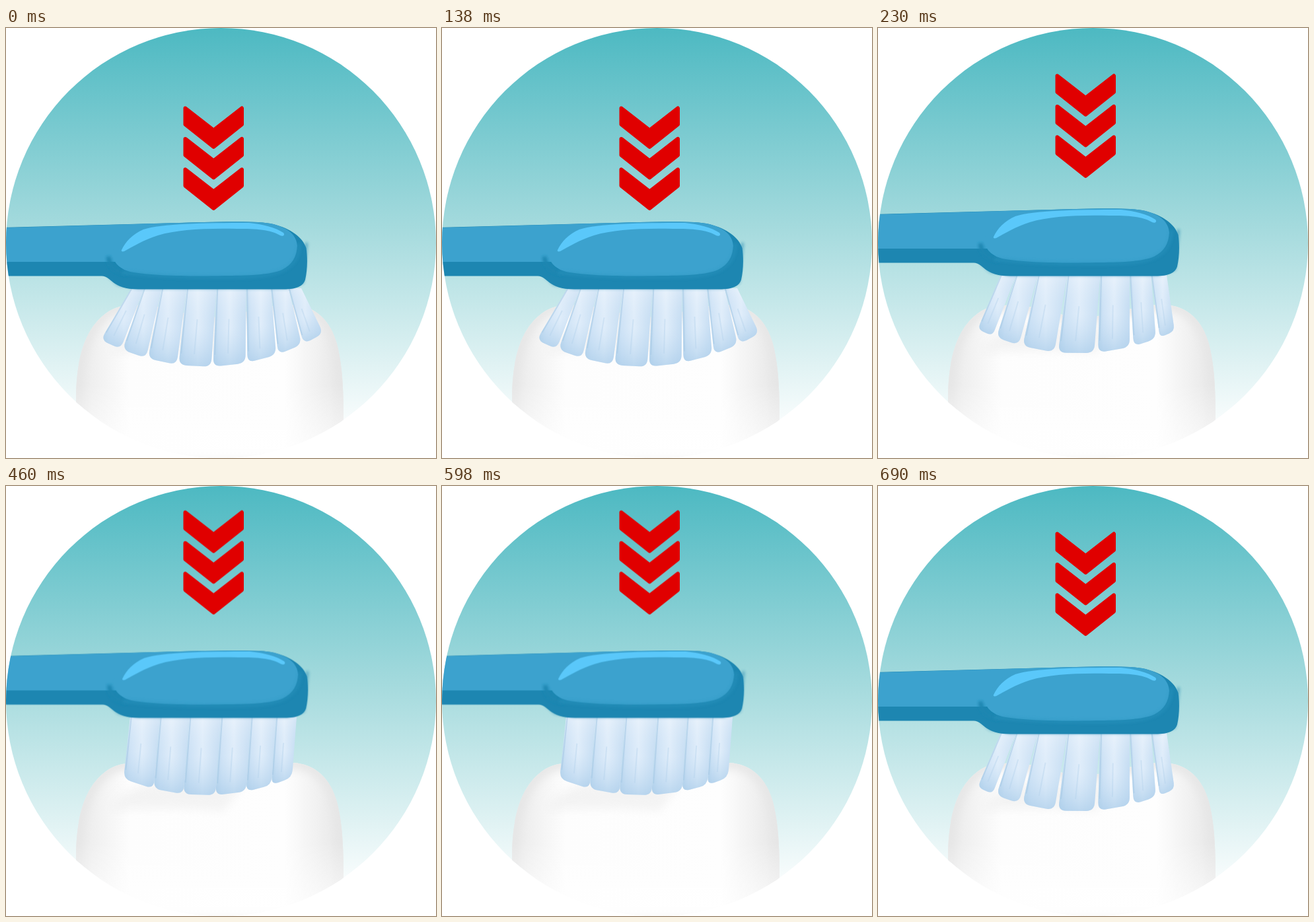
These frames come from a looping animation (651 px wide and 651 px high, 0.92 s). An HTML page:

```html
<!DOCTYPE html>
<html lang="en">
<head>
<meta charset="utf-8">
<title>Brushing pressure</title>
<style>
html, body { margin: 0; width: 100%; height: 100%; overflow: hidden; background: #fff; }
svg { display: block; width: 100%; height: 100%; }
.brush, .arrows, .pose { animation: .92s step-end infinite; }
.brush { animation-name: lift; }
.arrows { animation-name: rise; }
#pressed { animation-name: pressed; }
#middle { animation-name: middle; }
#relaxed { animation-name: relaxed; }
@keyframes lift {
  0%, 100% { transform: translate(0, 0); }
  25%, 75% { transform: translate(0, -20px); }
  50% { transform: translate(1.3px, -44.5px); }
}
@keyframes rise {
  0%, 100% { transform: translateY(0); }
  25%, 75% { transform: translateY(-49px); }
  50% { transform: translateY(-81.5px); }
}
@keyframes pressed { 0%, 100% { opacity: 1; } 25% { opacity: 0; } }
@keyframes middle { 0%, 50%, 100% { opacity: 0; } 25%, 75% { opacity: 1; } }
@keyframes relaxed { 0%, 75%, 100% { opacity: 0; } 50% { opacity: 1; } }
</style>
</head>
<body>
<svg viewBox="0 0 651 651">
  <defs>
    <clipPath id="disc"><circle cx="325.5" cy="325.5" r="325.5"/></clipPath>
    <linearGradient id="sky" x2="0" y2="1">
      <stop stop-color="#4db9c2"/>
      <stop offset=".46" stop-color="#a4dadd"/>
      <stop offset=".95" stop-color="#fff"/>
    </linearGradient>
    <linearGradient id="enamel">
      <stop stop-color="#e9e9e9"/>
      <stop offset=".2" stop-color="#fdfdfd"/>
      <stop offset=".78" stop-color="#fefefe"/>
      <stop offset="1" stop-color="#e6e6e6"/>
    </linearGradient>
    <linearGradient id="fade" x2="0" y2="1">
      <stop offset=".5" stop-color="#fff" stop-opacity="0"/>
      <stop offset=".9" stop-color="#fff" stop-opacity=".7"/>
    </linearGradient>
    <linearGradient id="tuft">
      <stop stop-color="#b9d6ed"/>
      <stop offset=".16" stop-color="#cfe3f6"/>
      <stop offset=".5" stop-color="#e3effb"/>
      <stop offset="1" stop-color="#c4dcf2"/>
    </linearGradient>
    <linearGradient id="tip" x2="0" y2="1">
      <stop stop-color="#f4f8fd" stop-opacity=".35"/>
      <stop offset=".5" stop-color="#c4ddf3" stop-opacity=".1"/>
      <stop offset="1" stop-color="#a6cae8" stop-opacity=".65"/>
    </linearGradient>
    <filter id="soft" x="-20%" y="-50%" width="140%" height="200%"><feGaussianBlur stdDeviation="2"/></filter>
    <filter id="haze" x="-20%" y="-50%" width="140%" height="200%"><feGaussianBlur stdDeviation="7"/></filter>
    <path id="chevron" d="M271.5 121.5 314.3 154.8 357 121.5V146L314.3 180 271.5 146Z"
      fill="#e00000" stroke="#e00000" stroke-width="6" stroke-linejoin="round"/>
    <path id="tooth" d="M106 660V555C107 505 117 462 145 437 160 424 172 420 190 420 250 418 270 438 310 438 350 438 390 418 435 419 468 421 491 442 501 478 510 513 511 550 511 600V660Z"/>
    <clipPath id="inTooth"><use href="#tooth"/></clipPath>
  </defs>
  <g clip-path="url(#disc)">
    <path d="M0 0H651V651H0Z" fill="url(#sky)"/>
    <use href="#tooth" fill="url(#enamel)"/>
    <g clip-path="url(#inTooth)">
      <use href="#tooth" fill="none" stroke="#e6e6e6" stroke-width="18" filter="url(#haze)"/>
    </g>
    <use href="#tooth" fill="url(#fade)"/>
    <path d="M160 490Q180 455 225 450H360L330 492Q240 485 160 490Z" fill="#ededed" opacity=".6" filter="url(#haze)"/>

    <g id="pressed" class="pose"></g>
    <g id="middle" class="pose"></g>
    <g id="relaxed" class="pose"></g>

    <g class="brush">
      <path d="M182 397H440" stroke="#7f97a8" stroke-width="6" opacity=".6" filter="url(#soft)"/>
      <path d="M153 345 157 376 170 388 200 393H425L449 385 455 325" fill="none" stroke="#1d86b1" stroke-width="4" opacity=".6" filter="url(#soft)"/>
      <path d="M-5 375.5H145C160 376 160 395.500 200 395.500H420C440 395.500 450 391 453 381 456 368 457 350 454.500 333 449 317 432 304 405 297 385 292 340 293 300 294L-5 302Z" fill="#1d86b1"/>
      <path d="M-5 302.5 300 294V354H-5Z" fill="#3ca2ce"/>
      <path d="M155 346Q157 368 182 372" fill="none" stroke="#1d86b1" stroke-width="7" filter="url(#soft)"/>
      <path d="M160 338C162 354 170 364 188 369 225 376 290 376 330 375 365 375 400 374 418 366 434 358 440 346 441 330 440 314 428 303 405 297 385 292 340 293 300 294L200 297Z" fill="#3ca2ce"/>
      <path d="M176 370Q250 378 330 377C400 377 443 374 444 326" fill="none" stroke="#2b94bf" stroke-width="5" opacity=".5" filter="url(#soft)"/>
      <path d="M175 336C181 323 192 312 208 305 235 296 300 295 368 295 388 297 408 302 420 310 423 314 419 316 415 314 400 305 380 304 350 304 300 303 260 305 230 314 208 321 192 331 179 338 176 339 174 338 175 336Z" fill="#5ac8fa"/>
    </g>

    <g class="arrows">
      <use href="#chevron"/>
      <use href="#chevron" y="46.4"/>
      <use href="#chevron" y="92.8"/>
    </g>
  </g>
</svg>
<script>
// Each pose spreads its tufts between two ends at the root and two at the tip.
// "swell" widens the middle tufts, "skew" below 1 moves them to the right.
const poses = [
  { id: "pressed", count: 8, y: 394, root: [190, 447], tip: [142, 482], swell: [.45, .25], skew: 1, gap: 3 },
  { id: "middle", count: 7, y: 374, root: [186, 437], tip: [148, 452], swell: [.4, .4], skew: 1, gap: 6 },
  { id: "relaxed", count: 6, y: 349.5, root: [188, 440], tip: [178, 433], swell: [.2, .2], skew: .874, gap: 0 }
];

const spread = ([from, to], swell, skew, u) =>
  from + (to - from) * (u - swell * Math.sin(2 * Math.PI * u) / (2 * Math.PI)) ** skew;

// The tips follow an arc that is lowest near the middle of the head.
const tipPoint = (x, y) => [x, y + 119 - .0016 * (x - 303) ** 2];

const mix = ([x, y], [u, v], k) => [x + (u - x) * k, y + (v - y) * k];
const toward = (a, b, r) => mix(a, b, r / Math.hypot(b[0] - a[0], b[1] - a[1]));

function tuft({ count, y, root, tip, swell, skew, gap }, i) {
  const top = j => [spread(root, swell[0], skew, j / count), y];
  const low = (j, inset) => tipPoint(spread(tip, swell[1], skew, j / count) + inset, y);
  const tl = top(i), tr = top(i + 1), bl = low(i, gap / 2), br = low(i + 1, -gap / 2);
  const r = Math.min(12, (br[0] - bl[0]) * .4);
  const d = `M${tl}L${toward(bl, tl, r)}Q${bl} ${toward(bl, br, r)}` +
    `L${toward(br, bl, r)}Q${br} ${toward(br, tr, r)}L${tr}Z`;
  const strand = (s, p, q) => {
    const a = mix(tl, tr, s), b = mix(bl, br, s);
    return `M${mix(a, b, p)}L${mix(a, b, q)}`;
  };
  return `<path d="${d}" fill="url(#tuft)"/><path d="${d}" fill="url(#tip)"/>` +
    `<path d="${strand(.04, 0, .85)}" stroke="#a9cbe6" stroke-width="2" opacity=".6"/>` +
    `<path d="${strand(.45, .4, .85)}" stroke="#b4d2ec" stroke-width="2" opacity=".4"/>`;
}

for (const pose of poses) {
  document.getElementById(pose.id).innerHTML =
    Array.from({ length: pose.count }, (_, i) => tuft(pose, i)).join("");
}
</script>
</body>
</html>
```
